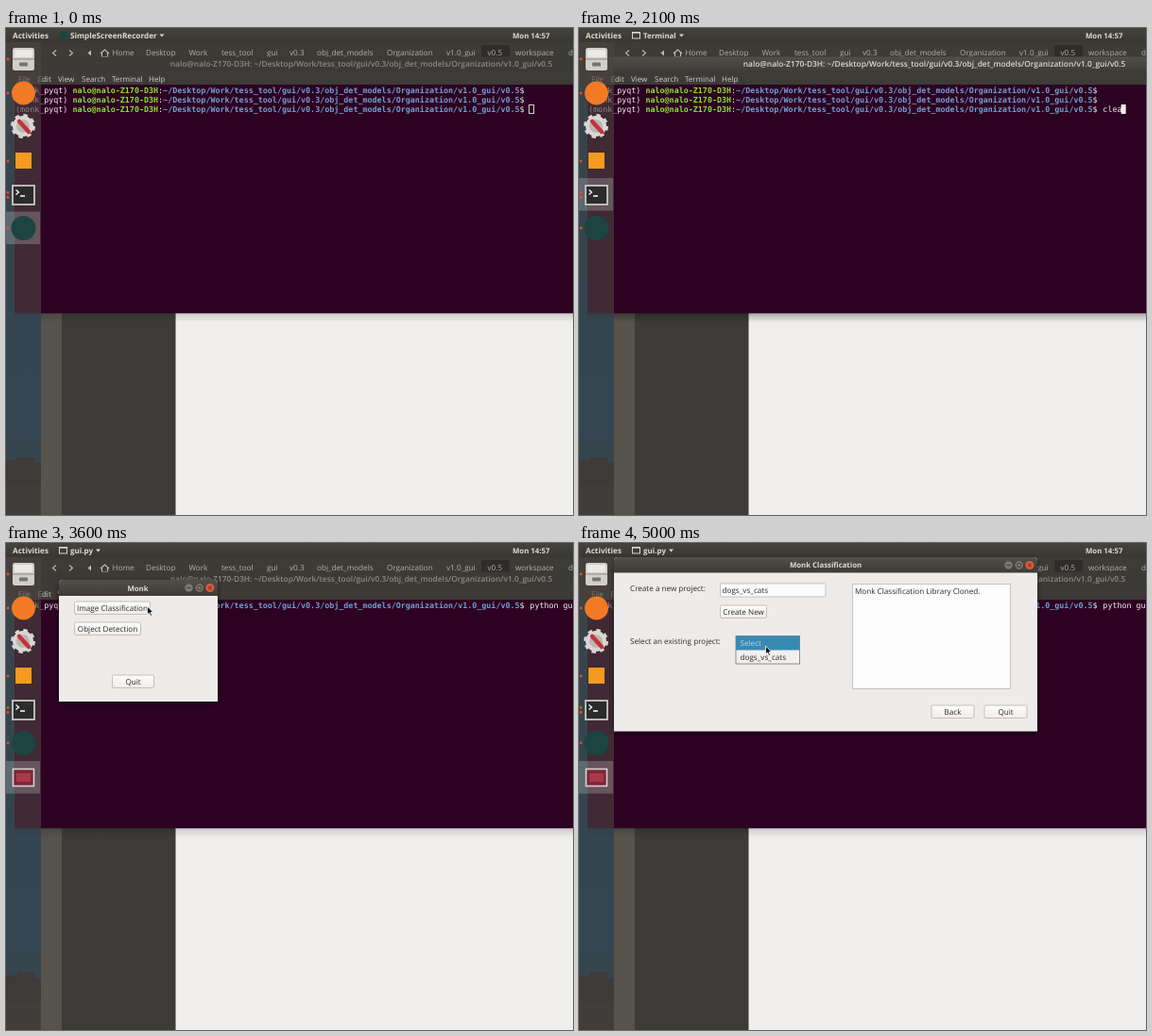
Write an HTML page that moves like this. It is 600 px wide and 516 px high and loops after 5.1 s.

```html
<!DOCTYPE html>
<html lang="en">
<head>
<meta charset="utf-8">
<title>Desktop session</title>
<style>
  html, body { margin: 0; width: 100%; height: 100%; overflow: hidden; background: #3c3b36; }
  svg { display: block; width: 100%; height: 100%; }
  text { font: 8.15px "Open Sans", "Noto Sans", sans-serif; white-space: pre; text-rendering: geometricPrecision; fill: #2d2c2a; }
  .mid { text-anchor: middle; }
  .bar text { font-weight: 700; font-size: 8px; fill: #dddbd6; }
  .tabs text { fill: #b5b2a9; }
  .menu text { font-size: 8px; fill: #d3d0c8; }
  .title { font-weight: 600; font-size: 8.35px; fill: #dfdbd2; }
  .cap { font-weight: 700; font-size: 7.8px; fill: #dfdbd2; }
  .dim { fill: #8d8a81; }
  .mono { font: 8.37px "DejaVu Sans Mono", "Liberation Mono", monospace; fill: #f0eeee; }
  .user { font-weight: 700; fill: #8ae234; }
  .path { font-weight: 700; fill: #729fcf; }
  .btn { fill: url(#face); stroke: #c3bfba; }
  .field { fill: #fcfcfc; stroke: #c5c1bc; }
</style>
</head>
<body>
<svg viewBox="0 0 600 516">
  <defs>
    <linearGradient id="sky" x2="0" y2="1">
      <stop offset="0" stop-color="#224352"/><stop offset=".5" stop-color="#0c4668"/>
      <stop offset=".8" stop-color="#0a4a70"/><stop offset="1" stop-color="#204354"/>
    </linearGradient>
    <linearGradient id="panel" x2="0" y2="1">
      <stop offset="0" stop-color="#45433d"/><stop offset="1" stop-color="#383732"/>
    </linearGradient>
    <linearGradient id="head" x2="0" y2="1">
      <stop offset="0" stop-color="#514f49"/><stop offset="1" stop-color="#3c3b37"/>
    </linearGradient>
    <linearGradient id="shade" x2="0" y2="1">
      <stop offset="0" stop-opacity=".3"/><stop offset="1" stop-opacity="0"/>
    </linearGradient>
    <linearGradient id="face" x2="0" y2="1">
      <stop offset="0" stop-color="#fdfdfc"/><stop offset="1" stop-color="#efedec"/>
    </linearGradient>
    <filter id="drop" x="-10%" y="-10%" width="120%" height="125%">
      <feDropShadow dx="0" dy="2" stdDeviation="3" flood-opacity=".45"/>
    </filter>
    <g id="winIcon"><rect x=".5" y=".5" width="8" height="6.5" fill="none" stroke="#d8d6d2"/><path d="M0 1.2h9" stroke="#d8d6d2"/></g>
    <path id="caret" d="M0 0h5l-2.5 3z" fill="#d8d6d2"/>
    <g id="lights">
      <circle r="4.2" fill="#7b786f"/><path d="M-2 0h4" stroke="#3c3b37"/>
      <circle cx="11.2" r="4.2" fill="#7b786f"/><rect x="9.4" y="-1.8" width="3.6" height="3.6" fill="none" stroke="#3c3b37" stroke-width=".8"/>
      <circle cx="22.4" r="4.5" fill="#e2573b"/><path d="M20.7-1.7l3.4 3.4m0-3.4l-3.4 3.4" stroke="#57251a"/>
    </g>
    <text id="prompt" class="mono" x="10.05" y="69">(monk_pyqt) <tspan class="user">nalo@nalo-Z170-D3H</tspan>:<tspan class="path">~/Desktop/Work/tess_tool/gui/v0.3/obj_det_models/Organization/v1.0_gui/v0.5</tspan>$</text>
  </defs>

  <!-- wallpaper and file manager -->
  <rect width="600" height="516" fill="url(#sky)"/>
  <path d="M0 458h12v-3h18v6h7v55H0z" fill="#272a2c"/>
  <path d="M0 486h37v30H0z" fill="#303131"/>
  <rect y="15" width="600" height="46" fill="#3c3b36"/>
  <rect x="37" y="60" width="22" height="456" fill="#55534b"/>
  <rect x="59" y="60" width="121" height="456" fill="#3d3b37"/>
  <rect x="179.500" y="60" width="421" height="456" fill="#f0eeec"/>
  <rect x="503" y="18" width="30" height="14" rx="2" fill="#2e2d29"/>
  <g class="tabs">
    <g fill="none" stroke="#bdbab1" stroke-width="1.1">
      <path d="M53 23.500l-3.500 3 3.500 3M67 23.500l3.500 3-3.500 3"/>
      <path d="M100 27l4.500-4 4.500 4M101.500 26v4.500h6V26"/>
    </g>
    <path d="M90 23.500v6l-3.500-3z" fill="#bdbab1"/>
    <g id="tabs"></g>
  </g>

  <!-- terminal -->
  <rect id="shadow" x="9" y="302" width="591" height="10" fill="url(#shade)"/>
  <rect x="9" y="30.500" width="600" height="16" fill="#3b3a36"/>
  <rect data-on="400-3000" x="9" y="30.500" width="600" height="16" fill="url(#head)"/>
  <rect x="9" y="46" width="600" height="14" fill="#3c3b37"/>
  <rect x="9" y="60" width="600" height="242.300" fill="#2d0122"/>
  <text id="title" class="title mid" x="376" y="40.700">nalo@nalo-Z170-D3H: ~/Desktop/Work/tess_tool/gui/v0.3/obj_det_models/Organization/v1.0_gui/v0.5</text>
  <g class="menu">
    <text x="13" y="56.700">File</text><text x="33.500" y="56.700">Edit</text><text x="55" y="56.700">View</text>
    <text x="80" y="56.700">Search</text><text x="112" y="56.700">Terminal</text><text x="151" y="56.700">Help</text>
  </g>
  <use href="#prompt"/>
  <g data-on="0-2200"><use href="#prompt" y="10"/><use href="#prompt" y="20"/></g>
  <text id="typed" class="mono"></text>
  <rect data-on="0-400" x="553.500" y="81.500" width="5" height="9" fill="none" stroke="#d6ced4"/>
  <rect data-on="400-3000" id="block" width="5" height="10" fill="#f0eeee"/>

  <!-- dock -->
  <rect y="15" width="37" height="501" fill="#4c4540" opacity=".62"/>
  <rect id="focus" width="36" height="34.500" fill="#fff" opacity=".2"/>
  <g id="dots" fill="#e2512c"></g>
  <g>
    <rect x="7" y="21" width="23" height="24" rx="2.500" fill="#d2cfc9"/>
    <path d="M7 33h23" stroke="#8d8983"/><rect x="9" y="23" width="19" height="8" fill="#ece9e4"/>
    <rect x="14" y="36.500" width="9" height="4" rx="1" fill="#77736d"/>
    <circle cx="18.500" cy="69" r="12.500" fill="#f27a24"/>
    <circle cx="18" cy="104" r="9" fill="#bab6b3" stroke="#d9d7d4" stroke-width="4"/>
    <circle cx="18" cy="104" r="11.500" fill="none" stroke="#d9d7d4" stroke-width="3" stroke-dasharray="4.500 4.530"/>
    <path d="M14 99l10 11" stroke="#c2323a" stroke-width="4.500" stroke-linecap="round"/>
    <rect x="10" y="132" width="17" height="17" fill="#f39a1f"/>
    <rect x="7" y="167" width="23" height="20" fill="#2b2b2b" stroke="#c9c7c3" stroke-width="1.800"/>
    <path d="M10.500 171.500l3 2.500-3 2.500M15 178h5" fill="none" stroke="#fff" stroke-width="1.300"/>
    <circle cx="18.500" cy="212" r="13" fill="#1c4542"/>
  </g>
  <g data-on="3000-3960 4100-5100">
    <rect x="7.500" y="239.500" width="22" height="18" fill="#7d2638" stroke="#d6d3cf" stroke-width="1.600"/>
    <path d="M11 244h15v9H11z" fill="#a8394a"/>
  </g>
  <g data-on="3960-4100" fill="#6b5560" stroke="#a39aa0">
    <rect x="12.500" y="234.500" width="12" height="9.500"/><path d="M12 236.500h13"/>
    <rect x="13.500" y="253.500" width="10" height="8"/><path d="M13 255.500h11"/>
  </g>

  <!-- top bar -->
  <g class="bar">
    <rect width="600" height="15" fill="url(#panel)"/>
    <text x="7" y="10.500" style="font-size:8.2px">Activities</text>
    <text x="536" y="10.500" style="font-size:7.8px">Mon 14:57</text>
    <g data-on="0-400">
      <circle cx="61" cy="7.500" r="4.500" fill="#1c4542"/>
      <text x="68" y="10.500" style="font-size:8.2px">SimpleScreenRecorder</text><use href="#caret" x="162.500" y="6.500"/>
    </g>
    <use data-on="400-5100" href="#winIcon" x="56" y="4"/>
    <g data-on="400-3000"><text x="68" y="10.500" style="font-size:7.9px">Terminal</text><use href="#caret" x="106" y="6.500"/></g>
    <g data-on="3000-5100"><text x="68" y="10.500">gui.py</text><use href="#caret" x="95" y="6.500"/></g>
  </g>

  <!-- launcher window -->
  <g data-on="3000-3700">
    <path d="M56 168V43q0-4 4-4h160q4 0 4 4v125z" fill="#eeeceb" filter="url(#drop)"/>
    <path d="M56 56V43q0-4 4-4h160q4 0 4 4v13z" fill="url(#head)"/>
    <text class="cap mid" x="139.500" y="50.500">Monk</text>
    <use href="#lights" x="193.500" y="47.500"/>
    <g id="menuButtons"></g>
  </g>

  <!-- project window -->
  <g id="project" data-on="3700-5100">
    <path d="M37 199.500V19q0-4 4-4h440q4 0 4 4v180.500z" fill="#eeeceb" filter="url(#drop)"/>
    <path d="M37 31.500V19q0-4 4-4h440q4 0 4 4v12.500z" fill="url(#head)"/>
    <text id="caption" class="cap mid" x="261" y="26.300">Monk Classification</text>
    <use href="#lights" x="454.500" y="23.500"/>
    <text x="54" y="51">Create a new project:</text>
    <rect id="nameBox" class="field" x="149.500" y="43" width="111.500" height="14" rx="1.500"/>
    <text id="name" x="151.500" y="53"></text>
    <text x="54" y="107">Select an existing project:</text>
    <rect class="field" x="289.500" y="43.500" width="167" height="111"/>
    <text x="292" y="53.500">Monk Classification Library Cloned.</text>
    <g id="projectButtons"></g>
    <g data-on="3700-4700">
      <rect class="btn" x="165.500" y="99" width="68" height="14" rx="1.500"/>
      <text x="168.600" y="109">Select</text>
      <path d="M225.500 105h4l-2 2.500z" fill="#4a4845"/>
    </g>
    <g data-on="4700-5100">
      <rect x="166" y="98.500" width="67.500" height="29.500" fill="#f2f0ef" stroke="#8f8c88"/>
      <rect x="166" y="98.500" width="67.500" height="15" fill="#398ab3"/>
      <text x="170.500" y="109" style="fill:#b9d8e8">Select</text>
      <text x="170.500" y="123.500">dogs_vs_cats</text>
    </g>
  </g>

  <!-- pointers -->
  <path data-on="500-1900" d="M510 189.500h1.500l.5.500.5-.500h1.500M512 190v6.500M510 197h1.500l.5-.500.5.500h1.500" fill="none" stroke="#bdb2bb" stroke-width=".9"/>
  <path data-on="3100-5100" id="pointer" d="M0 0v8.800l2-1.800 1.500 3.400 1.500-.7-1.500-3.200h2.800z" fill="#111" stroke="#fff" stroke-width=".8"/>
</svg>
<script>
const LOOP = 5100, CHAR = 5.04;
const $ = id => document.getElementById(id);
const set = (el, attrs) => { for (const k in attrs) el.setAttribute(k, attrs[k]); };

const button = ([label, x, y, w]) =>
  `<rect class="btn" x="${x}" y="${y}" width="${w}" height="13.5" rx="1.5"/>` +
  `<text class="mid" x="${x + w / 2}" y="${y + 9.7}">${label}</text>`;

$('menuButtons').innerHTML = [
  ['Image Classification', 72.5, 62, 80], ['Object Detection', 72.5, 84, 70], ['Quit', 112.5, 140, 44]
].map(button).join('');

$('projectButtons').innerHTML = [
  ['Create New', 149.5, 66, 49], ['Back', 373, 172, 45], ['Quit', 429, 172, 45]
].map(button).join('');

$('tabs').innerHTML = [
  ['Home', 112.5], ['Desktop', 148], ['Work', 193.5], ['tess_tool', 228], ['gui', 276], ['v0.3', 300],
  ['obj_det_models', 329], ['Organization', 403], ['v1.0_gui', 466], ['v0.5', 509.5], ['workspace', 539], ['data', 595]
].map(([s, x]) => `<text x="${x}" y="29.3">${s}</text>`).join('');

$('dots').innerHTML = [33, 69, 141, 174.5, 179.5, 212]
  .map(y => `<circle cx="2" cy="${y}" r="1.4"/>`).join('');

const cues = [...document.querySelectorAll('[data-on]')].map(el => ({
  el, spans: el.dataset.on.split(' ').map(s => s.split('-').map(Number))
}));

// time, x, y of the arrow tip
const route = [
  [3100, 300, 150], [3500, 149.5, 67], [3700, 149.5, 67], [3900, 172, 74],
  [4000, 122, 69], [4100, 122, 69], [4600, 200, 106], [4900, 197.5, 109], [LOOP, 197.5, 109]
];

function follow(t) {
  let i = 1;
  while (i < route.length - 1 && t > route[i][0]) i++;
  const [a, b] = [route[i - 1], route[i]];
  const k = Math.max(0, Math.min(1, (t - a[0]) / (b[0] - a[0])));
  return [1, 2].map(j => a[j] + (b[j] - a[j]) * k);
}

const typed = (text, t, start, step) => text.slice(0, Math.max(0, Math.floor((t - start) / step)));

function render(t) {
  for (const { el, spans } of cues)
    el.style.display = spans.some(([a, b]) => t >= a && t < b) ? '' : 'none';

  const active = t >= 400 && t < 3000, cleared = t >= 2200, closing = t >= 3960 && t < 4100;
  const line = cleared ? typed('python gui.py', t, 2250, 22) : typed('clear', t, 1880, 50);
  $('typed').textContent = line;
  set($('typed'), { x: 10.05 + 108 * CHAR, y: cleared ? 69 : 89 });
  set($('block'), { x: 553.5 + line.length * CHAR, y: cleared ? 61 : 81 });

  $('title').classList.toggle('dim', !active);
  set($('shadow'), { opacity: active ? 1 : .5 });
  $('caption').classList.toggle('dim', closing);
  set($('focus'), {
    y: t < 400 ? 194.5 : active ? 159 : 231,
    visibility: closing ? 'hidden' : 'visible'
  });

  $('name').textContent = typed('dogs_vs_cats', t, 3720, 18) + (t < 4100 ? '|' : '');
  $('nameBox').style.stroke = t < 4100 ? '#6f8ba0' : '';
  set($('project'), {
    transform: closing ? 'translate(50.2 26) scale(.941) translate(-37 -15)' : '',
    opacity: closing ? .96 : 1
  });

  const step = Math.floor((t + 20) / 100) * 100;
  set($('pointer'), { transform: `translate(${follow(step)})` });
}

function tick() {
  render(performance.now() % LOOP);
  requestAnimationFrame(tick);
}
tick();
</script>
</body>
</html>
```
